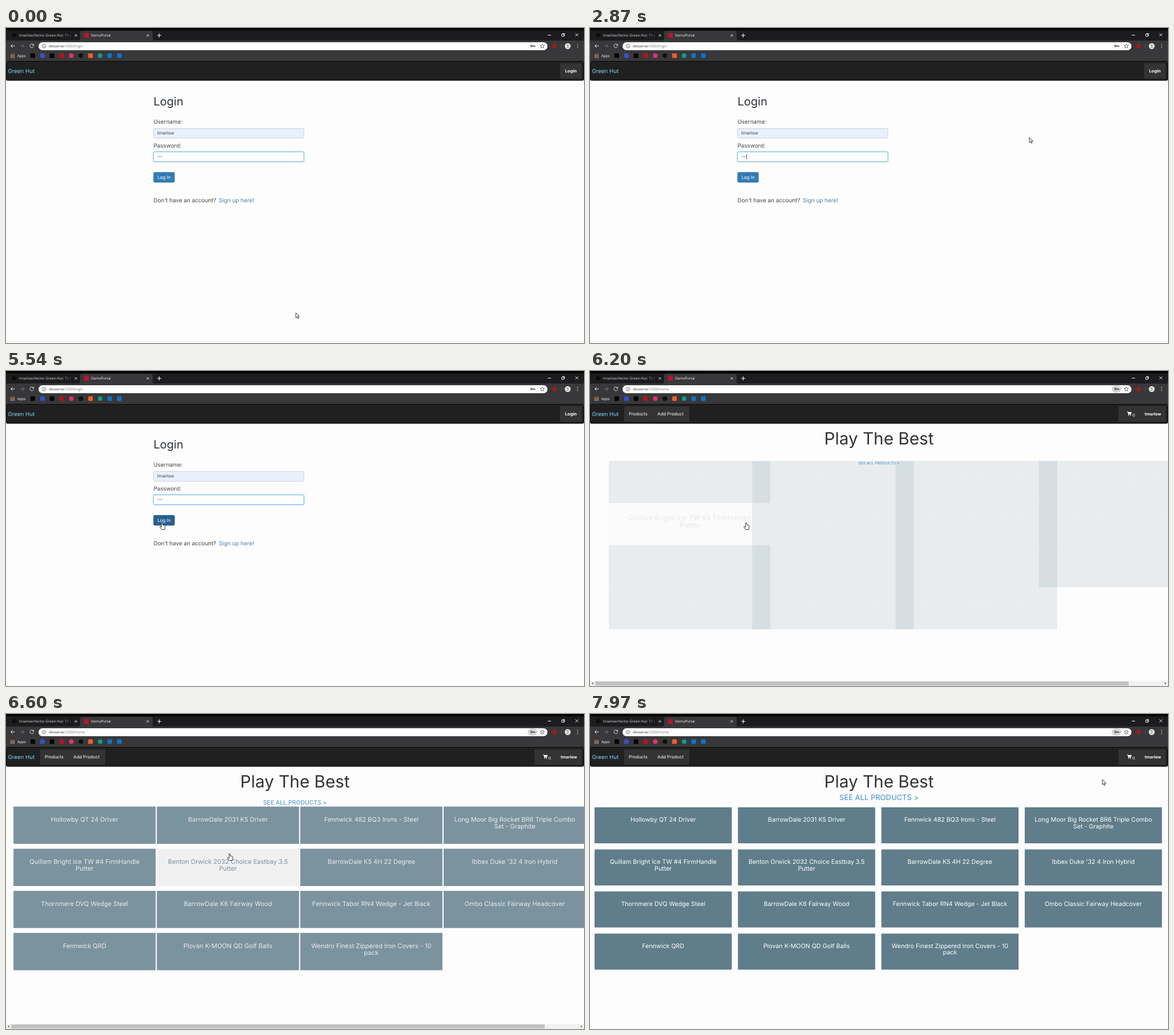
Recreate the animation shown at these times as an HTML page. Size 1013x553 px, loop 8 s.

```html
<!DOCTYPE html>
<html lang="en">
<head>
<meta charset="utf-8">
<title>Shop login</title>
<style>
  html, body { margin: 0; width: 100%; height: 100%; overflow: hidden; background: #fdfdfd; }
  svg { display: block; width: 100vw; height: 100vh; font: 7.8px Inter, sans-serif; text-rendering: geometricPrecision; }
  .ui { font: 6.2px "Open Sans", "Noto Sans", sans-serif; fill: #fff; }
  .line { fill: none; stroke: #ddd; stroke-width: 1; }
  .mid { text-anchor: middle; }
  .bold { font-weight: 700; }
  .label { font-size: 9.9px; fill: #444; }
</style>
</head>
<body>
<svg viewBox="0 0 1013 553" preserveAspectRatio="none">
  <defs>
    <linearGradient id="fade" gradientUnits="userSpaceOnUse" x1="100" x2="115">
      <stop stop-color="#ddd"/><stop offset="1" stop-color="#ddd" stop-opacity="0"/>
    </linearGradient>
    <filter id="glow" x="-5%" y="-50%" width="110%" height="200%"><feGaussianBlur stdDeviation="1.5"/></filter>
  </defs>

  <!-- browser window -->
  <rect width="1013" height="58.5" fill="#1c1c1e"/>
  <rect width="1013" height="4" fill="#050505"/>
  <path d="M0 22H127Q130 22 130 19V8Q130 5 133 5H254Q257 5 257 8V19Q257 22 260 22H1013V59H0Z" fill="#38383a"/>
  <g class="ui">
    <circle cx="14.5" cy="13" r="4" fill="#0c0c0d"/>
    <text x="23" y="15.3" style="fill:url(#fade)">tmarlow/Vector-Green-Hut: This</text>
    <rect x="137" y="9" width="8" height="8" fill="#c3102f"/>
    <text x="149" y="15.3">DemoPortal</text>
    <text x="20" y="51" >Apps</text>
  </g>
  <g class="line">
    <path d="M120.5 11l4 4m0-4l-4 4M246.5 11l4 4m0-4l-4 4"/>
    <path d="M265 13h7M268.500 9.500v7M949.500 12.500h5.500" stroke="#fff"/>
    <path d="M974 11h3.700v3.700h-3.700zM975.300 11v-1.300h3.700v3.700h-1.300M998 9.500l5 5m0-5l-5 5" stroke="#fff" stroke-width=".9"/>
    <path d="M15.500 31.500h-7m3.300-3.300l-3.300 3.300l3.300 3.300"/>
    <path d="M25 31.500h7m-3.300-3.300l3.300 3.300l-3.300 3.300" stroke="#777"/>
    <path d="M48 29.300a3.300 3.300 0 1 0 .5 3M48.500 27.800v2.500h-2.500"/>
    <path d="M973.500 27v9" stroke="#666" stroke-width=".6"/>
  </g>
  <rect x="57" y="25" width="892" height="14" rx="7" fill="#fff"/>
  <g fill="none" stroke="#555" stroke-width=".8">
    <circle cx="66.500" cy="31.700" r="3.200"/>
    <path d="M66.500 31v2.500M66.500 29.700v.6"/>
    <path d="M940 28l1.100 2.500l2.700.2l-2.100 1.700l.7 2.700l-2.400-1.500l-2.400 1.500l.7-2.700l-2.100-1.700l2.700-.2Z"/>
  </g>
  <ellipse id="keyBg" cx="922.700" cy="31.700" rx="8.500" ry="6.500" fill="#d5d5d5"/>
  <path d="M922.500 31.600h4.300v1.700M925 31.600v1.400" fill="none" stroke="#444" stroke-width="1.100"/>
  <circle cx="921" cy="31.600" r="1.500" fill="none" stroke="#444" stroke-width="1.100"/>
  <text class="ui" x="75" y="34" style="fill:#333">devserver<tspan id="path" fill="#777"></tspan></text>
  <rect x="957.500" y="28" width="7" height="7" fill="#a3171c"/>
  <circle cx="984.500" cy="31.700" r="5.200" fill="#e4e4e0"/>
  <path d="M981.500 34.500q3-3 6 0z" fill="#8a8a88"/><circle cx="984.500" cy="30.300" r="1.500" fill="#8a8a88"/>
  <path d="M1001.800 28.500v.01m0 3v.01m0 3v.01" stroke="#ddd" stroke-width="1.500" stroke-linecap="round"/>
  <g id="marks"></g>

  <!-- site bar -->
  <rect x=".5" y="58.500" width="1012" height="33.500" rx="2" fill="#202020" stroke="#060606"/>
  <text x="3.500" y="78.500" font-size="9.700" fill="#86d8fa">Green Hut</text>

  <g id="login">
    <rect x="971" y="62" width="38" height="27" fill="#333"/>
    <text class="mid bold" x="990" y="77.700" font-size="7.600" fill="#fff">Login</text>
    <text x="258.500" y="136" font-size="20" fill="#2c3238">Login</text>
    <text class="label" x="258.500" y="168.300">Username:</text>
    <rect x="258.500" y="176.500" width="263.500" height="17" rx="2" fill="#e8f0fe" stroke="#c8cad0" stroke-width=".8"/>
    <text x="265" y="187.400" fill="#444">tmarlow</text>
    <text class="label" x="258.500" y="209.500">Password:</text>
    <rect x="258.500" y="217.500" width="263.500" height="17" rx="2" fill="#9fd0f5" stroke="#9fd0f5" filter="url(#glow)"/>
    <rect x="258.500" y="217.500" width="263.500" height="17" rx="2" fill="#fefefe" stroke="#66afe9" stroke-width=".9"/>
    <path d="M266.200 225.700v.01m2.200 0v.01m2.200 0v.01m2.200 0v.01" stroke="#555" stroke-width="1.300" stroke-linecap="round"/>
    <path id="caret" d="M274.600 221.500v9" stroke="#222" stroke-width=".8"/>
    <rect id="button" x="258.700" y="253.300" width="36.600" height="17.700" rx="2"/>
    <text class="mid" x="277" y="265" font-size="8.100" fill="#fff">Log In</text>
    <text class="label" x="258.500" y="305.700">Don't have an account?</text>
    <text class="label" x="373" y="305.700" style="fill:#4f7cae">Sign up here!</text>
  </g>

  <g id="home">
    <path d="M60 62h114v27h-114zM926 62h83v27h-83z" fill="#333"/>
    <g fill="#fff">
      <text x="68" y="77.500">Products</text>
      <text x="118" y="77.500">Add Product</text>
      <path d="M941 71h1.800l.4 1h6l-.8 3.500h-4.400l.2.800h4.200v.7h-5l-1.100-5.300h-1.300z"/>
      <circle cx="944.300" cy="78" r=".8"/><circle cx="947.600" cy="78" r=".8"/>
      <text x="950.700" y="79.700" font-size="7">0</text>
      <text class="mid bold" x="986.500" y="77.600" font-size="7.200">tmarlow</text>
    </g>
    <text class="mid" x="506.500" y="128.500" font-size="29.700" fill="#333">Play The Best</text>
    <text id="all" class="mid" y="4.700" font-size="13" fill="#428bca">SEE ALL PRODUCTS &gt;</text>
    <g id="tiles" class="mid" font-size="10.700"></g>
    <g id="scroll">
      <rect y="544" width="1013" height="9" fill="#f1f1f1"/>
      <rect x="9" y="545" width="935" height="7" fill="#c1c1c1"/>
      <path d="M5.500 546.500v4l-2.500-2zM1007.500 546.500v4l2.500-2z" fill="#555"/>
    </g>
  </g>
  <path id="cursor" fill="#fff" stroke="#222" stroke-width=".9" stroke-linejoin="round"/>
</svg>
<script>
const LOOP = 8000, HOME_AT = 6080;
const ARROW = 'M0,0V9.2L2.1,7.2L3.5,10.3L4.9,9.7L3.6,6.7H6.4Z';
const HAND = 'M-1,.7Q0,-.6 1,.7V4L4.5,5Q5.6,5.5 5.4,7.5L4.5,12.5H-.6L-3.6,8.3Q-4,6.8 -2.7,7L-1,8.2Z';
const products = [
  'Hollowby QT 24 Driver', 'BarrowDale 2031 K5 Driver', 'Fennwick 482 BQ3 Irons - Steel',
  'Long Moor Big Rocket BR6 Triple Combo|Set - Graphite',
  'Quillam Bright Ice TW #4 FirmHandle|Putter', 'Benton Orwick 2032 Choice Eastbay 3.5|Putter',
  'BarrowDale K5 4H 22 Degree', "Ibbex Duke '32 4 Iron Hybrid",
  'Thornmere DVQ Wedge Steel', 'BarrowDale K6 Fairway Wood',
  'Fennwick Tabor RN4 Wedge - Jet Black', 'Ombo Classic Fairway Headcover',
  'Fennwick QRD', 'Plovan K-MOON QD Golf Balls', 'Wendro Finest Zippered Iron Covers - 10|pack'
];
// time, x, y of the pointer tip
const route = [
  [750, 508, 500], [1700, 880, 190], [2300, 985, 110], [2870, 770, 192], [3000, 770, 192],
  [3650, 273.500, 266], [6430, 273.500, 266], [6880, 640, 201], [6960, 640, 201], [7750, 898, 115]
];

const $ = id => document.getElementById(id);
const mix = (a, b, k) => a + (b - a) * k;
const set = (el, attrs) => { for (const k in attrs) el.setAttribute(k, attrs[k]); };
const show = (el, on) => { el.style.display = on ? '' : 'none'; };
function make(parent, tag, attrs, text = '') {
  const el = document.createElementNS('http://www.w3.org/2000/svg', tag);
  set(el, attrs);
  el.textContent = text;
  return parent.appendChild(el);
}

// the CSS "ease" curve
function ease(x) {
  if (x <= 0) return 0;
  if (x >= 1) return 1;
  const curve = (a, b, u) => 3 * a * u * (1 - u) ** 2 + 3 * b * u * u * (1 - u) + u ** 3;
  let lo = 0, hi = 1;
  for (let i = 0; i < 24; i++) {
    const u = (lo + hi) / 2;
    if (curve(.25, .25, u) < x) lo = u; else hi = u;
  }
  return curve(.1, 1, lo);
}

function pointerAt(t) {
  const i = route.findIndex(r => r[0] > t);
  if (i === 0) return route[0].slice(1);
  if (i < 0) return route[route.length - 1].slice(1);
  const [t0, x0, y0] = route[i - 1], [t1, x1, y1] = route[i];
  const u = (t - t0) / (t1 - t0), k = u * u * (3 - 2 * u);
  return [mix(x0, x1, k), mix(y0, y1, k)];
}

// bookmarks: app grid, then plain marks (rx 4 makes a circle)
for (let i = 0; i < 9; i++) {
  make($('marks'), 'rect', { x: 8 + i % 3 * 2.700, y: 45.300 + Math.floor(i / 3) * 2.700, width: 1.700, height: 1.700,
    fill: ['#e8685c', '#f0c14b', '#7fb3ef'][Math.floor(i / 3)] });
}
[['#050505', 1], ['#3450c8', 1], ['#050505', 1], ['#b3141c', 1], ['#e8306c', 4],
 ['#101010', 4], ['#f0602c', 1], ['#0c9c8c', 4], ['#0a74c8', 1], ['#0a74c8', 1]
].forEach(([fill, rx], i) => make($('marks'), 'rect', { x: 43 + 16.850 * i, y: 44.500, width: 8, height: 8, rx, fill }));

const tiles = products.map(name => {
  const box = make($('tiles'), 'rect', { rx: 1 });
  const label = make($('tiles'), 'text', {});
  name.split('|').forEach((line, i) => make(label, 'tspan', { x: 0, y: 3.900 + 11.600 * i }, line));
  return { box, label };
});

function drawTiles(p, px, py) {
  const w = mix(289.500, 240.500, p), h = mix(75.500, 63.200, p);
  const left = mix(36.700, 8, p), top = mix(157, 163.800, p);
  const spots = tiles.map((_, i) => [left + i % 4 * 251.300, top + Math.floor(i / 4) * 73.900]);
  const over = spots.findIndex(([x, y]) => px >= x && px < x + w && py >= y && py < y + h);
  tiles.forEach(({ box, label }, i) => {
    const [x, y] = spots[i];
    set(box, { x, y, width: w, height: h, fill: i === over ? '#eee' : '#607d8b', 'fill-opacity': p });
    set(label, {
      transform: `translate(${x + w / 2} ${y + mix(26.500, 21.400, p)}) scale(${mix(1.170, 1, p)})`,
      fill: i === over ? '#607d8b' : '#fff', 'fill-opacity': p
    });
  });
  return over >= 0;
}

function draw(t) {
  const home = t >= HOME_AT, [x, y] = pointerAt(t);
  let link;
  show($('login'), !home);
  show($('home'), home);
  show($('keyBg'), home);
  $('path').textContent = ':5300/' + (home ? 'home' : 'login');
  if (home) {
    const p = ease((t - HOME_AT) / 1000), slow = ease((t - HOME_AT) / 2000);
    link = drawTiles(p, x, y);
    const size = mix(65, 138, (p + slow) / 2) / 138;
    set($('all'), { transform: `translate(506.500 ${mix(161.800, 146, slow)}) scale(${size})` });
    show($('scroll'), p < .88);
  } else {
    link = x > 258 && x < 296 && y > 253 && y < 271.500;
    set($('button'), { fill: link ? '#286090' : '#337ab7', stroke: link ? '#204d74' : '#2e6da4', 'stroke-width': .6 });
    show($('caret'), t % 1060 >= 530);
  }
  set($('cursor'), { d: link ? HAND : ARROW, transform: `translate(${x} ${y})` });
}

const start = performance.now();
function frame() {
  draw((performance.now() - start) % LOOP);
  requestAnimationFrame(frame);
}
frame();
</script>
</body>
</html>
```
